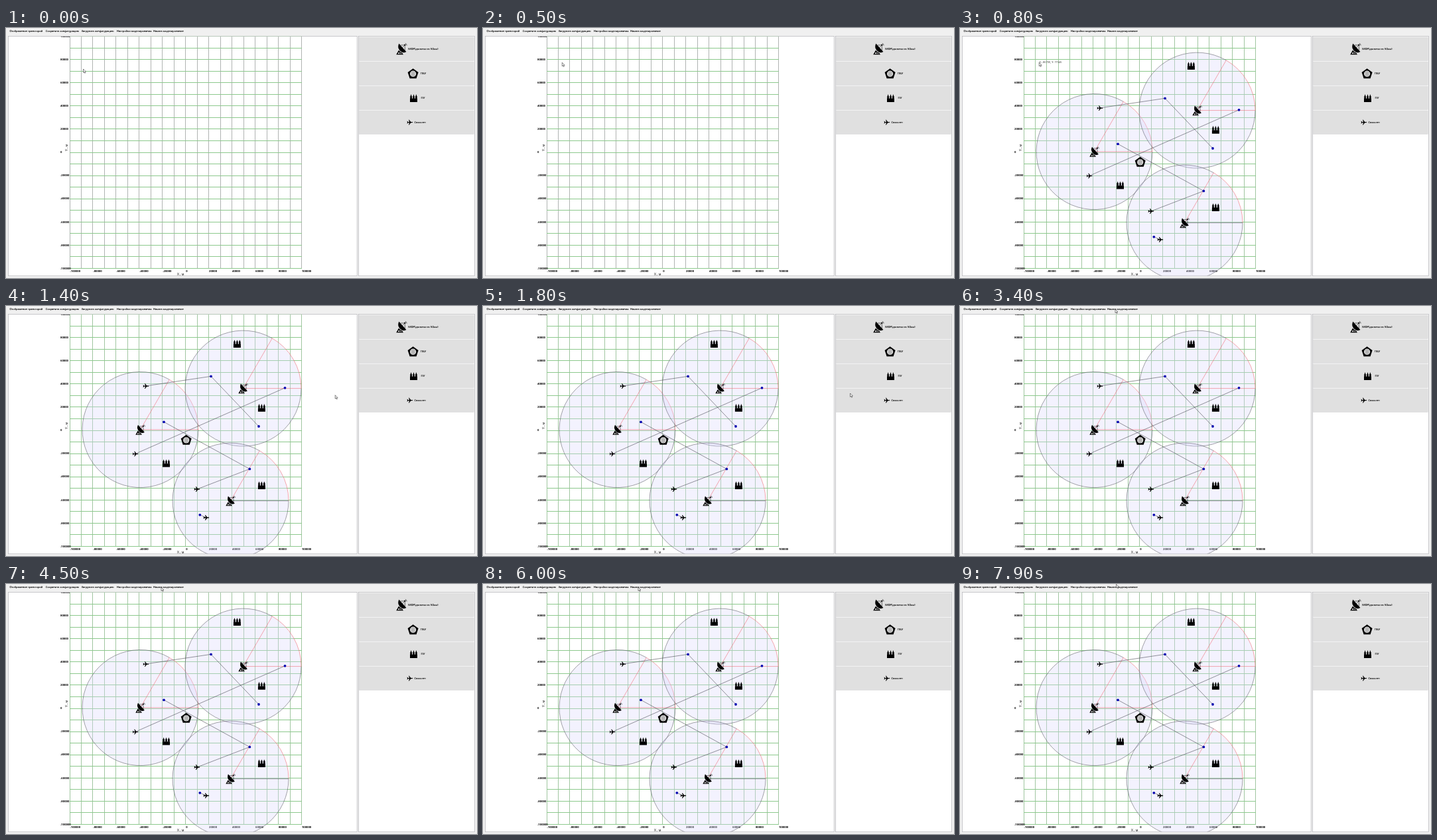
An HTML page for the animation above (8000 ms loop, 710 px wide and 378 px high).

```html
<!DOCTYPE html>
<html lang="ru">
<head>
<meta charset="utf-8">
<title>Моделирование</title>
<style>
html, body { margin: 0; width: 100%; height: 100%; overflow: hidden; background: #f0f0f0; }
svg { display: block; width: 710px; height: 378px; }
text { font-family: "Open Sans", "Noto Sans", sans-serif; fill: #000; }
.menu { font-size: 3.95px; stroke: #000; stroke-width: .12; }
.btn text { font-size: 4.25px; stroke: #000; stroke-width: .1; }
.axis text { font-size: 4.2px; font-weight: 700; }
.axis .name { font-size: 5px; font-weight: 400; }
#tip { font-size: 3.9px; fill: #333; }
.btn rect { fill: #e0e0e0; stroke: #d6d6d8; stroke-width: .6; }
.grid { fill: none; stroke-width: 1; shape-rendering: crispEdges; }
.zone { fill: #d8d5fa; fill-opacity: .32; }
.rim { fill: none; stroke: #55555e; stroke-width: .55; }
.beam { fill: none; stroke: #f0606a; stroke-width: .55; }
.route { fill: none; stroke: #33333a; stroke-width: .52; }
.dot { fill: #0808b0; }
</style>
</head>
<body>
<svg viewBox="0 0 710 378">
  <defs>
    <clipPath id="plot"><rect x="4" y="12.8" width="525" height="361.7"/></clipPath>
    <g id="radar">
      <path d="M-3.6-7.2L6.4 4Q2 6.4-2 2.7Q-6-1.4-3.6-7.2Z"/>
      <path d="M1-1.6L4.4-5.2M-1.6-5L4.4-5.2L4.6 2" fill="none" stroke="#000" stroke-width=".5"/>
      <circle cx="4.6" cy="-5.4" r="1"/>
      <path d="M5-7.6Q7-6.8 7-4.6" fill="none" stroke="#000" stroke-width=".5"/>
      <path d="M-3.8 1.6L-7.2 7.7H2.4L.6 5Q-2 4.4-3.8 1.6Z"/>
      <path d="M-3.6 4.2L-5 6.7H-2.4ZM-2.4 4.6L-1.2 6.7H.6Z" fill="#eee"/>
    </g>
    <g id="launcher">
      <path d="M-5.5 5.6V.2H5.5V5.6Z"/>
      <path id="tube" d="M-5.2.6V-3.2L-4.4-4.2V-5.6H-3.4V-4.2L-2.6-3.2V.6Z"/>
      <use href="#tube" x="3.9"/><use href="#tube" x="7.8"/>
    </g>
    <g id="post">
      <path d="M0-7.8L8-2L5 7.2H-5L-8-2Z"/>
      <circle cy=".3" r="4.7" fill="#d4d4d4"/>
      <path d="M0-4.2V4.8M-2.4-3Q-.6.3-2.4 3.6M2.4-3Q.6.3 2.4 3.6" fill="none" stroke="#666" stroke-width=".5"/>
    </g>
    <path id="plane" d="M4.4 0Q4.2-.6 3-.65H1.2L-1.2-3.9H-2L-.9-.65H-2.9L-3.8-1.8H-4.4L-4 0L-4.4 1.8H-3.8L-2.9.65H-.9L-2 3.9H-1.2L1.2.65H3Q4.2.6 4.4 0Z"/>
  </defs>

  <rect width="710" height="378" fill="#f0f0f0"/>
  <rect id="hover" x="220.5" y="1" width="48" height="7.4" fill="#d5e5f3"/>
  <g class="menu">
    <text x="5.5" y="5.9">Отображение траекторий</text>
    <text x="59.8" y="5.9">Сохранить конфигурацию</text>
    <text x="113.8" y="5.9">Загрузить конфигурацию</text>
    <text x="167" y="5.9">Настройки моделирования</text>
    <text x="222" y="5.9">Начать моделирование</text>
  </g>

  <g fill="#fff" stroke="#b4b4b8" stroke-width=".7">
    <rect x="3.4" y="12.4" width="525.8" height="362.4"/>
    <rect x="531.4" y="12.4" width="175.2" height="362.4"/>
  </g>

  <g clip-path="url(#plot)">
    <path class="grid" id="cols"/>
    <path class="grid" id="rows" stroke="#8cc98c"/>
    <g class="axis" id="axis">
      <text class="name" x="258" y="374.2">X , м</text>
      <text class="name" transform="translate(93 186) rotate(-90)">Y , м</text>
    </g>
    <g id="scene">
      <g id="zones"></g>
      <path class="route" d="M210.5 121L309 106.3L381 182M195 223.5L420.5 123.8M288 277L367.3 246.4L238 175.3M302 320L292.3 315.8"/>
      <g id="items"></g>
    </g>
  </g>

  <g class="btn">
    <rect x="532.6" y="14" width="172.6" height="35.4"/>
    <rect x="532.6" y="51" width="172.6" height="35.4"/>
    <rect x="532.6" y="88" width="172.6" height="35.4"/>
    <rect x="532.6" y="125" width="172.6" height="35.4"/>
    <use href="#radar" transform="translate(596.3 31.6) scale(1.12)"/>
    <use href="#post" x="613.6" y="69"/>
    <use href="#launcher" x="614.5" y="106.4"/>
    <use href="#plane" x="609" y="142.6"/>
    <text x="606.3" y="32.7">МФР(дальность 50км)</text>
    <text x="624.8" y="70.2">ПБУ</text>
    <text x="625.6" y="107.4">ПУ</text>
    <text x="615.4" y="144.3">Самолет</text>
  </g>

  <text id="tip"></text>
  <path id="cursor" d="M0 0V5.4L1.3 4.3L2.2 6.3L3.1 5.9L2.2 4H3.9Z" fill="#fff" stroke="#222" stroke-width=".55"/>
</svg>
<script>
const LOOP = 8000, LEFT = 96, TOP = 12.5, DX = 17.475, DY = 17.55;
const MIDX = LEFT + 10 * DX, MIDY = TOP + 10 * DY;
const $ = id => document.getElementById(id);

function add(parent, tag, attrs, text) {
  const el = document.createElementNS('http://www.w3.org/2000/svg', tag);
  for (const k in attrs) el.setAttribute(k, attrs[k]);
  if (text !== undefined) el.textContent = text;
  parent.appendChild(el);
}

let cols = '', rows = '';
for (let i = 0; i <= 20; i++) {
  const x = LEFT + i * DX, y = TOP + i * DY;
  cols += `M${Math.floor(x) + .5} ${TOP}V${TOP + 20 * DY}`;
  rows += `M${LEFT} ${Math.floor(y) + .5}H${LEFT + 20 * DX}`;
  if (i % 2 === 0) {
    add($('axis'), 'text', { x: x + .4, y: 368.6 }, (i - 10) * 10000);
    add($('axis'), 'text', { x: 82, y: y + 1.2 }, (10 - i) * 10000);
  }
}
$('cols').setAttribute('d', cols);
$('rows').setAttribute('d', rows);

const put = (id, list) => list.forEach(([x, y]) => add($('items'), 'use', { href: '#' + id, x, y }));
const radars = [[202.5, 187], [357.5, 124.6], [338.5, 294.6]], R = 87.5;
radars.forEach(([x, y], i) => {
  const ex = x + R / 2, ey = y - R * Math.sqrt(3) / 2;
  const zone = (tag, attrs) => add($('zones'), tag, attrs);
  zone('circle', { class: 'zone', cx: x, cy: y, r: R });
  zone('path', { class: 'rim', d: `M${ex} ${ey}A${R} ${R} 0 1 0 ${x + R} ${y}` });
  zone('path', { class: 'beam', d: `M${x} ${y}L${ex} ${ey}A${R} ${R} 0 0 1 ${x + R} ${y}` });
  zone('path', { class: i < 2 ? 'beam' : 'route', d: `M${x} ${y}h${R}` });
});
put('radar', radars);
put('launcher', [[348.4, 57.3], [385.4, 154.2], [241.5, 238], [385.4, 271.3]]);
put('post', [[271.7, 202.6]]);
put('plane', [[211, 121.2], [195.3, 223.6], [288, 277], [302, 320]]);
[[309, 106.3], [381, 182], [420.5, 123.8], [238, 175.3], [367.3, 246.4], [292.3, 315.8]]
  .forEach(([cx, cy]) => add($('items'), 'circle', { class: 'dot', cx, cy, r: 1.9 }));

// time, x, y
const path = [
  [0, 116.5, 62], [500, 119.24175, 52.25777], [800, 119.24175, 52.25777],
  [1600, 566, 150], [1800, 553.5, 132], [2500, 231.5, 5], [2700, 234, 5],
  [6700, 234, 5], [6800, 235.6, .4], [LOOP, 235.6, .4]
];

function pointer(t) {
  const i = path.findIndex(p => p[0] > t);
  const [t0, x0, y0] = path[i - 1], [t1, x1, y1] = path[i];
  const u = (t - t0) / (t1 - t0), k = u * u * (3 - 2 * u);
  return [x0 + (x1 - x0) * k, y0 + (y1 - y0) * k];
}

const show = (el, on) => { el.style.visibility = on ? 'visible' : 'hidden'; };

function draw(now) {
  const t = Math.floor(now % LOOP / 100) * 100;
  const loaded = t >= 800, [x, y] = pointer(t), tip = $('tip');
  show($('scene'), loaded);
  show($('hover'), t >= 2400 && t < 3000);
  $('cols').setAttribute('stroke', loaded ? '#a0c6a0' : '#b0b4b2');
  $('cursor').setAttribute('transform', `translate(${x} ${y})`);
  show(tip, loaded && x < LEFT + 20 * DX && y > TOP);
  tip.setAttribute('x', x + .3);
  tip.setAttribute('y', y + .6);
  tip.textContent = `X: ${Math.round((x - MIDX) / DX * 1e4)}, Y: ${Math.round((MIDY - y) / DY * 1e4)}`;
}

const start = performance.now();
function tick() {
  draw(performance.now() - start);
  requestAnimationFrame(tick);
}
tick();
</script>
</body>
</html>
```
